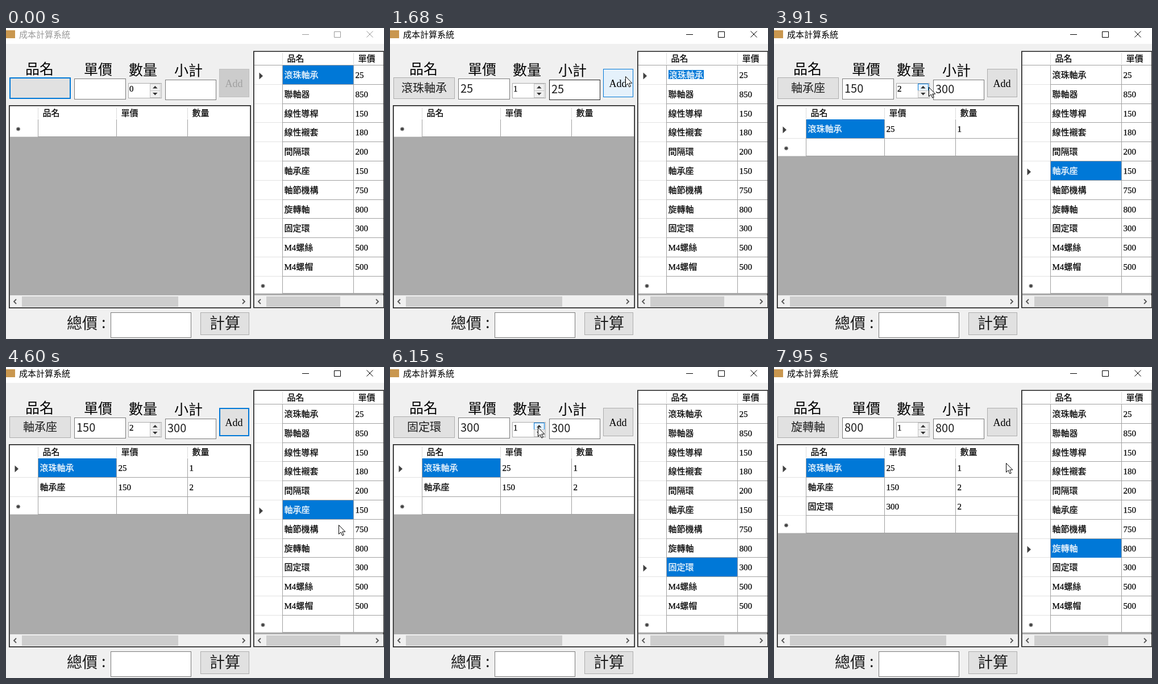
An HTML page for the animation above (8 s loop, 665 by 548 pixels).

```html
<!DOCTYPE html>
<html lang="zh-TW">
<head>
<meta charset="utf-8">
<title>成本計算系統</title>
<style>
html, body { margin: 0; width: 100%; height: 100%; overflow: hidden; background: #f0f0f0; }
svg { display: block; }
text { font-family: "Noto Sans CJK TC", "Noto Sans CJK", sans-serif; white-space: pre; }
.cell { font-family: "Liberation Serif", "Noto Sans CJK TC", "Noto Sans CJK", serif; }
.mid { text-anchor: middle; }
</style>
</head>
<body>
<svg width="665" height="548" viewBox="0 0 665 548">
  <g id="base"></g>
  <g id="live"></g>
  <path id="cursor" d="M.5 .5V16.5L4.2 13L6.8 19L9.3 17.9L6.7 12.2H11.8Z" fill="#fff" stroke="#000"/>
</svg>
<script>
const LOOP = 8000, START = 120, TICK = 77.2;
const DWELL = 120;  // pointer rest before and after a click
const PRESS = 80;   // time a button stays pressed
const FADE = 240;   // time a hovered text box stays dark
const BLUE = '#0078d7', GREY = '#a0a0a0', INK = '#1c1c1c', PITCH = 33.8;

const items = [['滾珠軸承', 25], ['聯軸器', 850], ['線性導桿', 150], ['線性襯套', 180],
  ['間隔環', 200], ['軸承座', 150], ['軸節機構', 750], ['旋轉軸', 800],
  ['固定環', 300], ['M4螺絲', 500], ['M4螺帽', 500]];

// Each order: pass a way point, pick an item, set its quantity, add it
const orders = [
  { via: [START, 395, 519], item: 0, qty: 1, pick: 980, spin: 1380, add: 1780 },
  { via: [2430, 556, 255], item: 5, qty: 2, pick: 2590, spin: 3760, add: 4290 },
  { via: [4590, 586, 276], item: 8, qty: 2, pick: 5060, spin: 6260, add: 6690 },
  { via: [7090, 570, 252], item: 7, qty: 1, pick: 7560 }
];

// Controls: x, y, width, height
const NAME = [6, 87, 108, 38], SUB = [280, 91, 90, 36], SPIN = [253, 98, 19, 13],
  ADD = [375, 72, 53, 50], CALC = [342, 501, 86, 40];
const LEFT = [7, 57, 195, 320, 429], RIGHT = [437, 487, 612, 664];
const leftY = i => Math.round(161 + i * PITCH), rightY = i => Math.round(66 + i * PITCH);

// Drawing helpers
const rect = (x, y, w, h, fill) => `<rect x="${x}" y="${y}" width="${w}" height="${h}" fill="${fill}"/>`;
const frame = ([x, y, w, h], fill, line, sw = 1) =>
  rect(x, y, w, h, line) + rect(x + sw, y + sw, w - 2 * sw, h - 2 * sw, fill);
const path = (d, stroke, sw = 1, fill = 'none') =>
  `<path d="${d}" fill="${fill}" stroke="${stroke}" stroke-width="${sw}"/>`;
const text = (x, y, s, size, fill = '#000', cls = '', sw = 0) =>
  `<text x="${x}" y="${y}" font-size="${size}" fill="${fill}" stroke="${fill}" stroke-width="${sw}" class="${cls}">${s}</text>`;
const cell = (x, y, s, fill) => text(x, y, s, 15, fill, 'cell', .25);
const marker = (x, y) => path(`M${x} ${y - 6}l6.5 6l-6.5 6z`, 'none', 0, '#404040');
const star = (x, y) =>
  path(`M${x - 3.5} ${y}h7M${x} ${y - 3.5}v7M${x - 2.5} ${y - 2.5}l5 5M${x + 2.5} ${y - 2.5}l-5 5`, '#404040', 1.3);

function scrollbar(x, w, thumb, thumbW) {
  const arrow = (ax, d) => path(`M${ax + 2 * d} 478l${-4 * d} 4l${4 * d} 4`, '#555', 1.8);
  return rect(x, 471, w, 21, '#f0f0f0') + rect(thumb, 473, thumbW, 18, '#cdcdcd') +
    arrow(x + 9, 1) + arrow(x + w - 11, -1);
}

function gridHead(cols, y, h, names) {
  const end = cols[cols.length - 1];
  let s = rect(cols[0], y, end - cols[0], h, '#fff') + rect(cols[0], y + h - 1, end - cols[0], 1, GREY);
  names.forEach((n, i) => {
    s += rect(cols[i + 1] - 1, y + 2, 1, h - 4, '#dcdcdc') + text(cols[i + 1] + 7.5, y + 17, n, 15, '#000', '', .25);
  });
  return s;
}

function gridRow(cols, y, bottom, values = []) {
  const [a, b] = cols, end = cols[cols.length - 1], h = bottom - y;
  let s = rect(a, y, end - a, h, '#fff') + rect(a, bottom - 1, b - a, 1, '#e3e3e3') +
    rect(b - 1, bottom - 1, end - b + 1, 1, GREY);
  cols.slice(1, -1).forEach(x => s += rect(x - 1, y, 1, h, GREY));
  values.forEach((v, i) => s += cell(cols[i + 1] + 2.5, y + 21.5, v));
  return s;
}

function drawBase() {
  let s = rect(0, 0, 665, 548, '#f0f0f0') + rect(0, 0, 665, 28, '#fff') + rect(0, 4, 16, 14, '#c9974f');
  [['品名', 34], ['單價', 137], ['數量', 216], ['小計', 296]]
    .forEach(([label, x], i) => s += text(x, 81 + i, label, 25));
  s += frame([120, 89, 91, 37], '#fff', '#7a7a7a') + frame([215, 97, 59, 27], '#fff', '#adadad') +
    frame([184, 501, 142, 45], '#fff', '#7a7a7a');
  s += frame([5, 136, 426, 358], '#ababab', '#222', 1.5) +
    gridHead(LEFT, 138, 24, ['品名', '單價', '數量']) + scrollbar(7, 422, 28, 275);
  s += frame([435, 40.5, 230, 453], '#ababab', '#222', 1.5) +
    gridHead(RIGHT, 42, 24, ['品名', '單價']) + scrollbar(437, 227, 458, 130);
  items.forEach((item, i) => s += gridRow(RIGHT, rightY(i), rightY(i + 1), item));
  return s + gridRow(RIGHT, rightY(11), 468) + star(452, 454.5) +
    text(107, 529.5, '總價', 27, INK) + text(168, 529, ':', 27, INK);
}

// Pointer stops follow from the orders
const stops = [];
const rest = (t, x, y) => stops.push([t - DWELL, x, y], [t + DWELL, x, y]);
for (const o of orders) {
  stops.push(o.via);
  rest(o.pick, 556, rightY(o.item) + 20);
  if (o.spin) rest(o.spin, 260, 106);
  if (o.add) rest(o.add, 414, 85);
}
stops.push([7920, 406, 167]);

function pointer(t) {
  const i = stops.findIndex(s => s[0] > t);
  if (i < 1) return stops[i < 0 ? stops.length - 1 : 0].slice(1);
  const [a, b] = [stops[i - 1], stops[i]], p = (t - a[0]) / (b[0] - a[0]);
  return [1, 2].map(k => Math.round(a[k] + (b[k] - a[k]) * p));
}

function over([x, y, w, h], t) {
  const [px, py] = pointer(t);
  return t >= START && px >= x && px <= x + w && py >= y && py <= y + h;
}

// Button style: fill, border, border width, text
const looks = {
  off: ['#ccc', '#bfbfbf', 1, GREY], plain: ['#e1e1e1', '#adadad', 1, '#000'],
  hot: ['#e5f1fb', BLUE, 1, '#000'], down: ['#cce4f7', '#005499', 1, '#000'],
  focus: ['#e1e1e1', BLUE, 2, '#000']
};
const button = (box, look) => frame(box, ...looks[look].slice(0, 3));

function addLook(t, order) {
  if (!order) return 'off';
  if (t >= order.add - PRESS && t < order.add) return 'down';
  if (over(ADD, t)) return 'hot';
  return t >= order.add ? 'focus' : 'plain';
}

function drawLive(t) {
  const order = orders.filter(o => t >= o.pick).pop();
  const added = orders.filter(o => t >= o.add);
  const row = order ? order.item : 0, [name, price] = items[row];
  const qty = !order ? 0 : t >= order.spin ? order.qty : 1;
  const active = t > orders[0].pick - DWELL, editing = order && !added.length;
  const tone = active ? '#000' : '#999', look = addLook(t, order);
  const subHot = [0, .25, .5, .75, 1].some(k => over(SUB, t - k * FADE));

  let s = text(23, 17, '成本計算系統', 15, tone) +
    path('M521 11.5h12M577.5 6.5h11v10h-11zM634.5 5.5l11 11M645.5 5.5l-11 11', tone);
  s += button(NAME, active ? 'plain' : 'focus') + frame(SUB, '#fff', subHot ? '#222' : '#7a7a7a');
  if (order) {
    s += text(60, 112.5, name, 20, INK, 'mid') + text(124, 113.5, price, 20, INK) +
      text(284, 114.5, price * qty, 20, INK);
  }
  s += cell(217, 112, qty);
  s += frame(SPIN, ...(over([253, 97, 21, 27], t) ? ['#e5f1fb', BLUE] : ['#f0f0f0', '#c4c4c4'])) +
    frame([253, 110, 19, 13], '#f0f0f0', '#c4c4c4') +
    path('M258 106.5l4.3 -4.5l4.3 4.5zM258 114l4.3 4.5l4.3 -4.5z', 'none', 0, '#333');
  s += button(ADD, look) + text(401, 104, 'Add', 18, looks[look][3], 'cell mid');
  s += button(CALC, over(CALC, t) ? 'hot' : 'plain') + text(385, 530, '計算', 27, INK, 'mid');

  added.forEach((o, i) => s += gridRow(LEFT, leftY(i), leftY(i + 1), [...items[o.item], o.qty]));
  if (added.length) {
    s += rect(57, 161, 137, 33, BLUE) + cell(59.5, 182.5, items[added[0].item][0], '#fff') + marker(15.5, 179.5);
  }
  const end = leftY(added.length);
  s += gridRow(LEFT, end, end + 31) + star(21.5, end + 17);

  const y = rightY(row);
  s += rect(487, y, 124, 33, editing ? '#fff' : BLUE) + marker(445.5, y + 18.5);
  if (editing) s += rect(490, y + 8, 62, 16, BLUE);
  return s + cell(editing ? 491 : 489.5, y + 21.5, name, '#fff');
}

const $ = id => document.getElementById(id);
$('base').innerHTML = drawBase();
let shown = -1;
function play() {
  const now = performance.now() % LOOP;
  const t = now < START ? 0 : START + Math.floor((now - START) / TICK) * TICK;
  if (t !== shown) {
    shown = t;
    $('live').innerHTML = drawLive(t);
    $('cursor').setAttribute('transform', `translate(${pointer(t)})`);
    $('cursor').setAttribute('visibility', t < START ? 'hidden' : 'visible');
  }
  requestAnimationFrame(play);
}
play();
</script>
</body>
</html>
```
